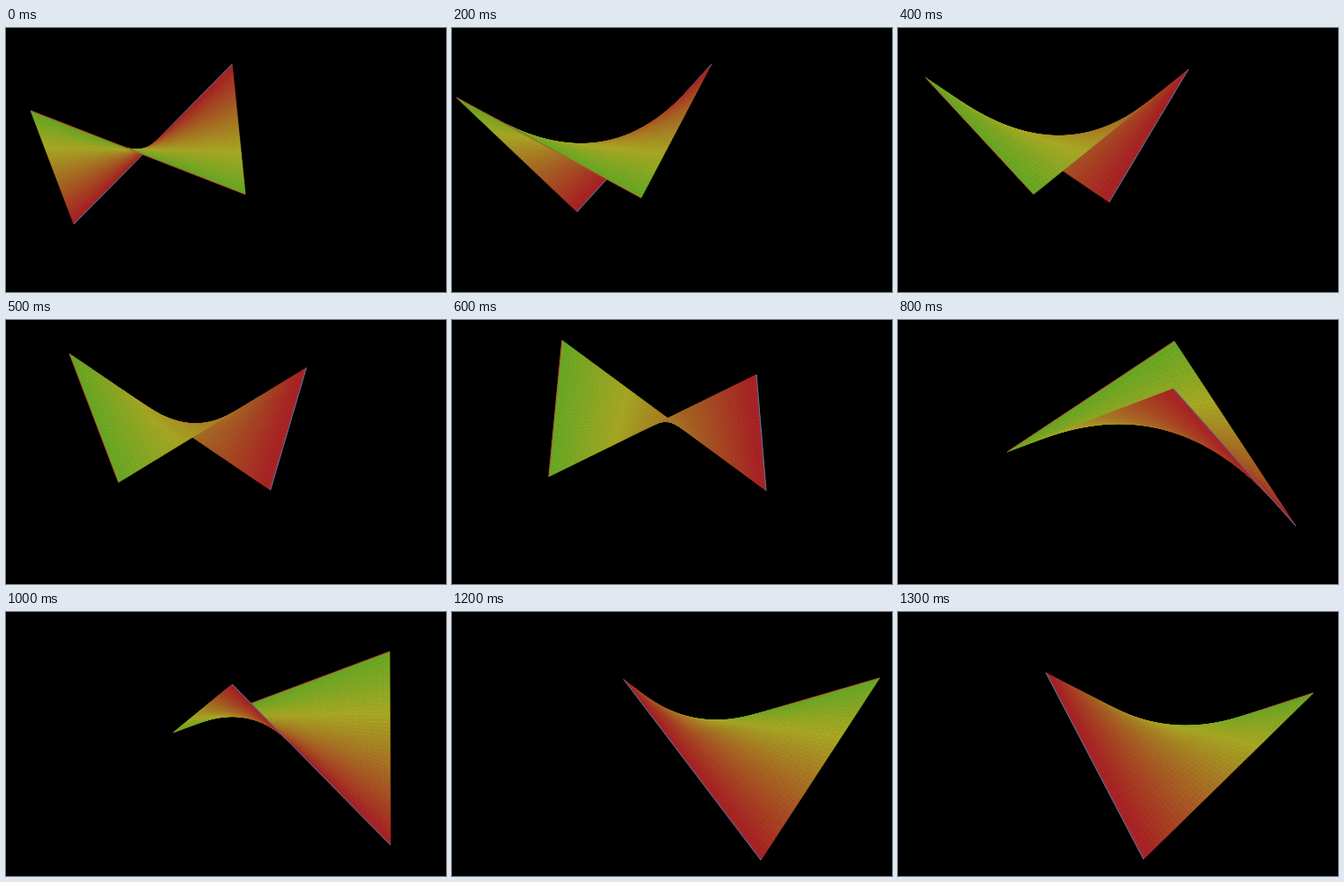
Recreate the animation shown at these times as an HTML page with a canvas. Size 500 px wide and 300 px high, loop 1400 ms.

```html
<!DOCTYPE html>
<html lang="en">
<head>
<meta charset="utf-8">
<title>Turning saddle</title>
<style>
  html, body { margin: 0; width: 100%; height: 100%; overflow: hidden; background: #000; }
  canvas { display: block; }
</style>
</head>
<body>
<canvas id="stage" width="500" height="300"></canvas>
<script>
const ctx = document.getElementById('stage').getContext('2d');
const STEP = 100, STEPS = 14;
const ROWS = 48, COLS = 32;

// Paths of the four corners: positions at a few turn values
const turns = [0, 2, 4, 6, 7, 9, 11, 13, 14];
const paths = {
  a: { x: [28, 5, 31, 125, 184, 314, 436, 486, 472], y: [94, 79, 56, 23, 14.5, 24, 45, 75, 92] },
  b: { x: [272, 215, 154, 110, 104.5, 124, 190, 273, 313], y: [189, 193, 189, 178, 169, 150, 137, 137, 144] },
  c: { x: [257, 295, 330, 346, 342, 313, 257, 195, 168], y: [41, 41, 47, 62, 68.4, 78, 82, 76.5, 69] },
  d: { x: [77, 142, 240, 357, 401, 452, 437, 351, 279], y: [223, 209, 198, 194, 203.5, 234, 265, 282, 281] }
};

// Cubic through the four knots around t
function along(values, t) {
  let s = 0;
  while (s < turns.length - 4 && turns[s + 2] <= t) s++;
  let sum = 0;
  for (let i = s; i < s + 4; i++) {
    let w = values[i];
    for (let j = s; j < s + 4; j++) {
      if (j !== i) w *= (t - turns[j]) / (turns[i] - turns[j]);
    }
    sum += w;
  }
  return sum;
}

const mix = (p, q, k) => ({ x: p.x + (q.x - p.x) * k, y: p.y + (q.y - p.y) * k });

const cells = [];
for (let row = 0; row < ROWS; row++) {
  for (let col = 0; col < COLS; col++) {
    cells.push({ row, col, u: (col + 0.5) / COLS, v: (row + 0.5) / ROWS });
  }
}

function line(p, q, color) {
  ctx.strokeStyle = color;
  ctx.lineWidth = 1;
  ctx.beginPath();
  ctx.moveTo(p.x, p.y);
  ctx.lineTo(q.x, q.y);
  ctx.stroke();
}

function draw(turn) {
  const corner = {};
  for (const k in paths) corner[k] = { x: along(paths[k].x, turn), y: along(paths[k].y, turn) };
  const { a, b, c, d } = corner;
  const point = (col, row) =>
    mix(mix(a, d, row / ROWS), mix(b, c, row / ROWS), col / COLS);

  // The side facing the viewer moves around the patch; paint back to front
  const facing = (14.5 * turn - 80) * Math.PI / 180;
  const depth = cell => Math.cos(facing) * cell.u + Math.sin(facing) * cell.v;
  cells.sort((m, n) => depth(m) - depth(n));

  ctx.fillStyle = '#000';
  ctx.fillRect(0, 0, 500, 300);
  ctx.lineJoin = 'bevel';
  for (const { row, col, v } of cells) {
    const quad = [point(col, row), point(col + 1, row), point(col + 1, row + 1), point(col, row + 1)];
    ctx.fillStyle = ctx.strokeStyle = `hsl(${90 - 93 * v}, 65%, 40%)`;
    ctx.lineWidth = 0.7;
    ctx.beginPath();
    for (const p of quad) ctx.lineTo(p.x, p.y);
    ctx.closePath();
    ctx.fill();
    ctx.stroke();
    if (row === 0) line(quad[0], quad[1], '#c4442a');
    if (row === ROWS - 1) line(quad[3], quad[2], '#4680a8');
  }
}

let shown = -1;
function tick() {
  const step = Math.floor(performance.now() / STEP) % STEPS;
  if (step !== shown) {
    shown = step;
    draw(step < 8 ? step : step + 1); // the turn skips ahead once
  }
  requestAnimationFrame(tick);
}
tick();
</script>
</body>
</html>
```
